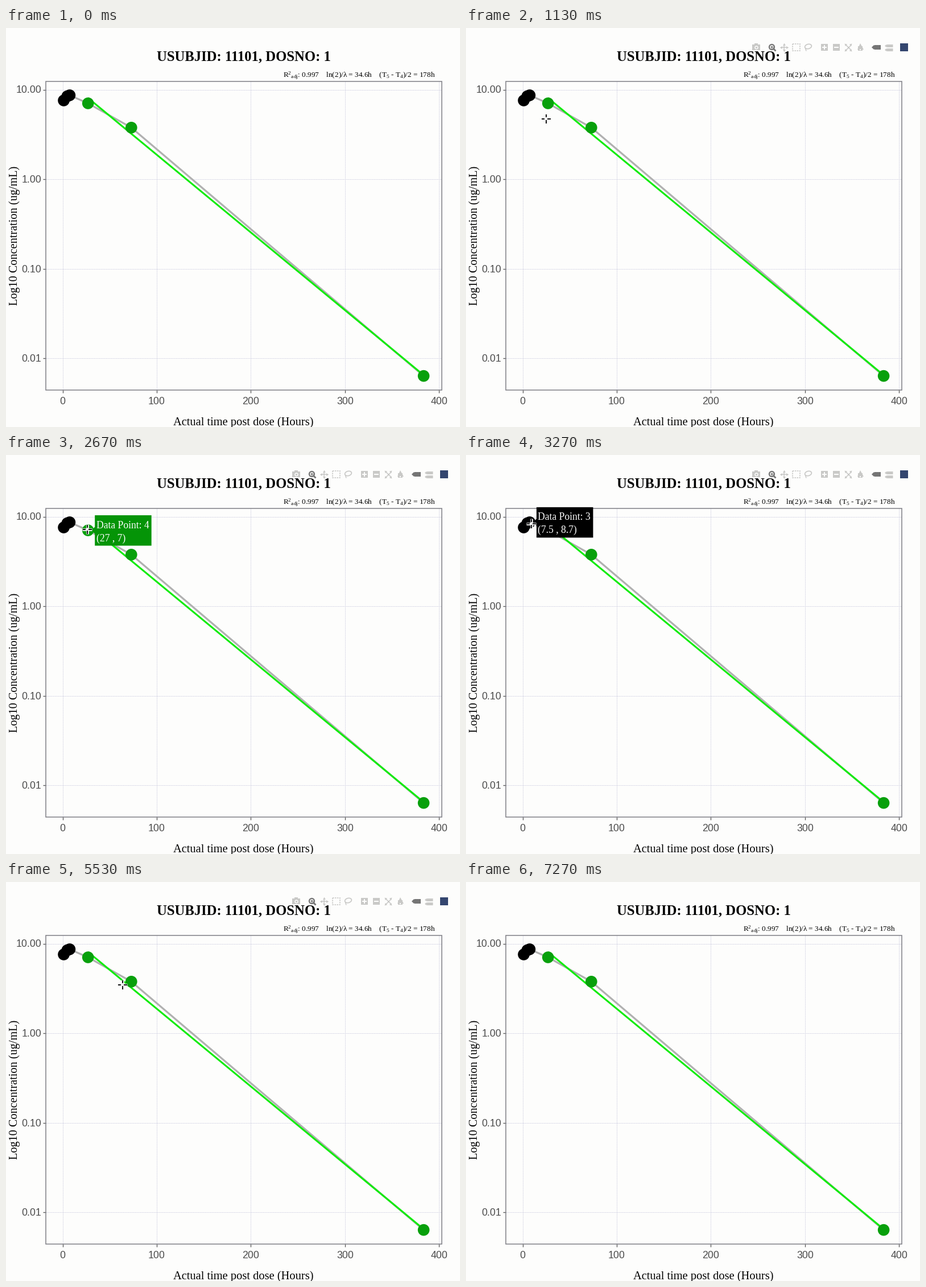
These frames come from a looping animation (798x702 px, 8.77 s). A matplotlib script:

```python
import matplotlib.pyplot as plt
import numpy as np
from matplotlib.animation import FuncAnimation
from matplotlib.patches import Circle, Ellipse, Polygon, Rectangle

W, H = 798, 702
LOOP_MS, FRAMES = 8770, 331
BG, GREEN, TIP_GREEN, FIT = "#fdfdfc", "#08a00c", "#059407", "#10ec0a"
PALE, DARK, NAVY = "#c9c9c7", "#757575", "#34466f"
SERIF, SANS = "Liberation Serif", "Liberation Sans"
LEFT, RIGHT, TOP, BOTTOM = 69.5, 765.5, 93.5, 636.5

# hours, concentration
DATA = [(1.2, 7.58), (5, 8.45), (7.5, 8.66), (27, 7.04), (73, 3.77), (383.5, 0.00637)]

# Mouse gestures: start ms, end ms, x and y reached, number of the point hovered
GESTURES = [
    (300, 1170, 139, 157, None), (1200, 1470, 142, 136, 4), (1700, 1970, 142, 130, 4),
    (2670, 3330, 114, 120, 3), (4100, 4300, 103, 124, 3), (4470, 4630, 100, 128, 1),
    (5100, 5380, 186, 207, None), (5380, 5530, 204, 180, None),
    (5530, 5870, 219, 177, 5), (6700, 6960, 400, -12, None)]
ENTRY = (316, 685)

plt.rcParams["mathtext.default"] = "regular"
# With 72 dpi one point is one pixel, so sizes below are in pixels.
fig = plt.figure(figsize=(W / 72, H / 72), dpi=72, facecolor=BG)
ax = fig.add_axes([0, 0, 1, 1])
ax.set_xlim(-0.5, W - 0.5)
ax.set_ylim(H - 0.5, -0.5)
ax.axis("off")


def label(x, y, s, size, family=SERIF, color="black", ha="left", **kw):
    kw.setdefault("zorder", 5)
    return ax.text(x, y, s, fontsize=size, family=family, color=color, ha=ha,
                   va="baseline", **kw)


def line(xs, ys, color, lw, z=2, **kw):
    return ax.plot(xs, ys, color=color, lw=lw, zorder=z, solid_capstyle="butt", **kw)[0]


def patch(shape, z=2):
    ax.add_patch(shape)
    shape.set_zorder(z)
    return shape


def px(hours):
    return 99 + 1.6548 * hours


def py(conc):
    return 108 + 157.6 * (1 - np.log10(conc))


POINTS = [(px(h), py(c)) for h, c in DATA]


def draw_chart():
    grid = dict(color="#d6d6e6", lw=1, z=0.5, linestyle=(0, (2, 1)))
    for hours in range(0, 401, 100):
        x = px(hours)
        line([x, x], [TOP, BOTTOM], **grid)
        line([x, x], [BOTTOM, BOTTOM + 5], "#555555", 1.3)
        label(x, 662, str(hours), 17.7, SANS, "#4d4d4d", "center")
    for conc in (10, 1, 0.1, 0.01):
        y = py(conc)
        line([LEFT, RIGHT], [y, y], **grid)
        line([LEFT - 5, LEFT], [y, y], "#555555", 1.3)
        label(62, y + 6, f"{conc:.2f}", 17.7, SANS, "#4d4d4d", "right")
    patch(Rectangle((LEFT, TOP), RIGHT - LEFT, BOTTOM - TOP, fill=False,
                    ec="#7d7d84", lw=1.5))

    xs, ys = np.array(POINTS).T
    line(xs, ys, "#b0b0b0", 3.2, 3)
    fit = np.polyfit(xs[3:], ys[3:], 1)
    line(xs[3:], np.polyval(fit, xs[3:]), FIT, 3.1, 3.5)
    for i, point in enumerate(POINTS):
        patch(Circle(point, 10.3, fc="black" if i < 3 else GREEN, lw=0), 4)


def draw_titles():
    label(417, 57, "USUBJID: 11101, DOSNO: 1", 24.6, ha="center", weight="bold")
    label(417, 698, "Actual time post dose (Hours)", 20.5, ha="center")
    label(19.5, 365, "Log10 Concentration (ug/mL)", 20.2, ha="center",
          rotation=90, rotation_mode="anchor")
    label(754, 86, "R$^2{}_{adj}$: 0.997    ln(2)/λ = 34.6h    "
                   "(T$_5$ \u2010 T$_4$)/2 = 178h", 13.25, ha="right")


def draw_toolbar():
    parts = []

    def mark(x, marker, size, color=PALE, y=33.5, lw=0, fill=True):
        parts.extend(ax.plot(x, y, marker=marker, ms=size, mec=color, mew=lw,
                             mfc=color if fill else "none", zorder=1))

    # camera
    for x in (507.5, 511):
        mark(x, "s", 10)
    mark(509, "s", 6, y=29.5)
    mark(509, "o", 5, BG, lw=1.5, fill=False)
    # magnifier
    mark(536, "o", 9, DARK, y=32, lw=2.2, fill=False)
    mark(536, "+", 5, DARK, y=32, lw=1.4)
    parts.append(line([539, 544], [35, 40], DARK, 2.8, 1))
    # pan and autoscale arrows
    mark(558.5, "+", 11, lw=1.5)
    mark(671, "x", 9, lw=1.5)
    for angle in range(0, 360, 90):
        for x, turn, radius in ((558.5, angle, 5.2), (671, angle + 45, 7)):
            a = np.radians(turn)
            mark(x + radius * np.cos(a), (3, 0, turn - 90), 5.5,
                 y=33.5 - radius * np.sin(a))
    # box select and lasso
    parts.append(patch(Rectangle((573.5, 27.5), 12.5, 12, fill=False, ec=PALE, lw=1.6,
                                 ls=(0, (1.6, 0.9))), 1))
    parts.append(patch(Ellipse((601, 32), 12, 8, angle=-15, fill=False, ec=PALE,
                               lw=1.7), 1))
    parts.append(line([596, 597.5], [35, 40], PALE, 1.5, 1))
    # zoom in and out
    for x, sign in ((629, "+"), (650, "_")):
        mark(x, "s", 12.5)
        mark(x, sign, 8, BG, lw=2)
    # home
    mark(692, "^", 11, y=31.5)
    mark(692, "s", 8, y=35.5)
    mark(692, "s", 2.5, BG, y=37.5)
    # hover tags
    for x, y, size, color in ((721, 33.5, 8, DARK), (742, 30, 5, PALE), (742, 37, 5, PALE)):
        mark(x + 1.5, "_", 11, color, y, lw=size)
        mark(x - 4.5, "D", size / 1.5, color, y)
    mark(769.5, "s", 14, NAVY)
    return parts


draw_chart()
draw_titles()
toolbar = draw_toolbar()

tip_box = patch(Polygon([(0, 0)], lw=0), 7)
tip_lines = [label(0, 0, "", 17.6, color="white", zorder=8) for _ in range(2)]
halo = line([], [], "#f4f4f4", 4.6, 9)
arms = line([], [], "black", 1.8, 10)


def cross(inner, outer):
    """Four arms around the origin, separated by gaps."""
    along = np.array([-outer, -inner, np.nan, inner, outer, np.nan])
    across = np.zeros(along.size)
    return np.r_[along, across], np.r_[across, along]


CROSSES = [(halo, cross(0, 8.5)), (arms, cross(2.5, 8))]


def mouse_at(t):
    """Cursor position and hovered point number at time t."""
    pos, hovered = np.array(ENTRY, float), None
    for start, end, x, y, number in GESTURES:
        s = np.clip((t - start) / (end - start), 0, 1)
        pos += (np.array([x, y]) - pos) * (1 - (1 - s) ** 2)
        if s > 0.4:
            hovered = number
    return pos, hovered


def show_tip(number):
    for artist in (tip_box, *tip_lines):
        artist.set_visible(number is not None)
    if number is None:
        return
    x, y = POINTS[number - 1]
    hours, conc = DATA[number - 1]
    left, right, top, bottom = x + 12, x + 111.5, y - 26.5, y + 27
    tip_box.set_xy([(x + 6, y), (left, y - 6), (left, top), (right, top),
                    (right, bottom), (left, bottom), (left, y + 6)])
    tip_box.set_facecolor("black" if number < 4 else TIP_GREEN)
    rows = f"Data Point: {number}", f"({hours:.2g} , {conc:.2g})"
    for i, (text, row) in enumerate(zip(tip_lines, rows)):
        text.set_position((left + 2.5, y - 4 + 23 * i))
        text.set_text(row)


def update(i):
    t = i * LOOP_MS / FRAMES
    enter, leave = GESTURES[0][0], GESTURES[-1][1]
    fade = np.interp(t, [enter, enter + 200, leave, leave + 290], [0, 1, 1, 0])
    for part in toolbar:
        part.set_alpha(fade)
        part.set_visible(fade > 0)

    (x, y), hovered = mouse_at(t)
    for artist, (dx, dy) in CROSSES:
        artist.set_data(round(x) + dx, round(y) + dy)
        artist.set_visible(enter <= t <= leave)
    show_tip(hovered)
    return [*toolbar, tip_box, *tip_lines, halo, arms]


anim = FuncAnimation(fig, update, frames=FRAMES, interval=LOOP_MS / FRAMES,
                     repeat=True, repeat_delay=0, blit=False)
plt.show()
```
